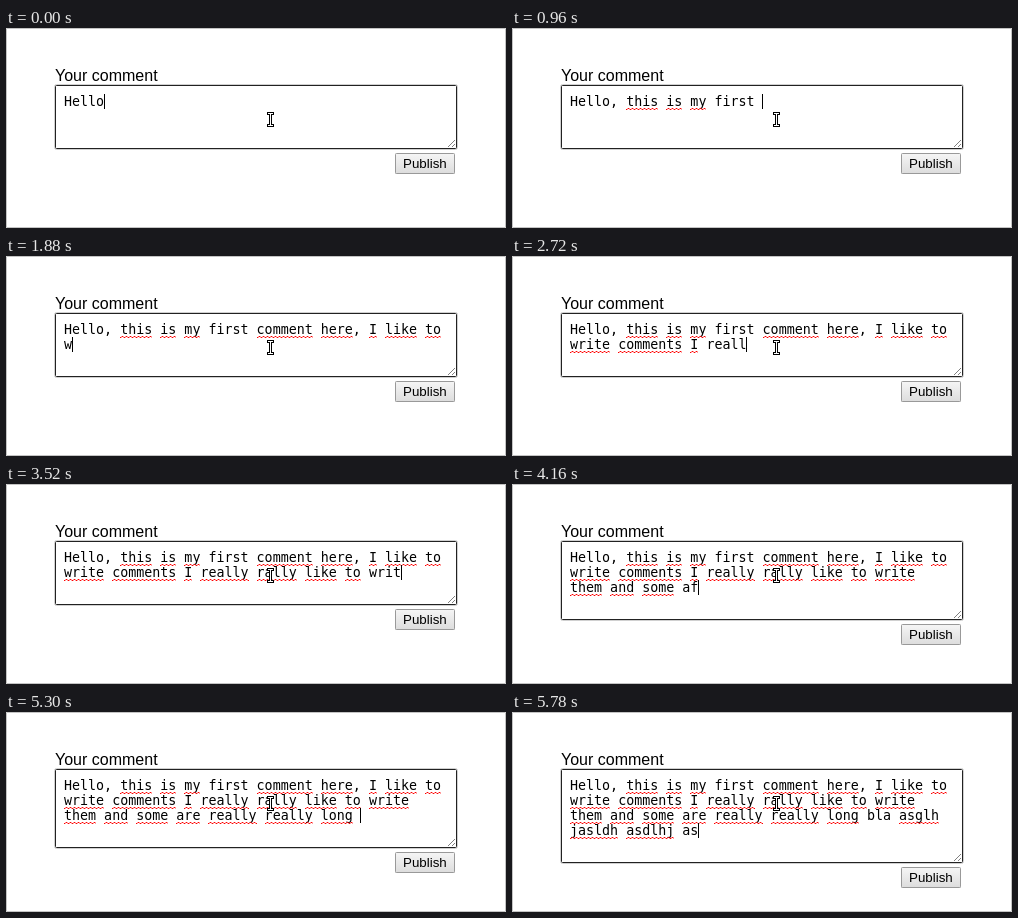
Recreate the animation shown at these times as an HTML page with a canvas. Size 500x200 px, loop 5820 ms.

```html
<!DOCTYPE html>
<html lang="en">
<head>
<meta charset="utf-8">
<title>Growing comment box</title>
<style>
html, body { margin: 0; width: 100%; height: 100%; overflow: hidden; background: #fff; }
canvas { display: block; width: 500px; height: 200px; }
</style>
</head>
<body>
<canvas id="stage" width="500" height="200"></canvas>
<script>
const ctx = document.getElementById('stage').getContext('2d');
const LOOP = 5820, COLS = 47, LEFT = 58, TOP = 66, LINE = 15;
const MONO = '13.333px "DejaVu Sans Mono", monospace';
const SANS = '"Liberation Sans", Arial, sans-serif';

// "<" stands for the backspace key
const KEYS = 'Hello, this is my first comment here, I like to ' +
  'write comments I really rally like to write ' +
  'them and some af<re really really long bla asglh jasldh asdlhj as';
// [time in ms, keys pressed so far]
const PACE = [[0, 5], [960, 24], [1860, 49], [3520, 90], [4160, 108], [5300, 131], [5440, 142], [5780, 157]];
const KNOWN = new Set(['Hello', 'first', 'bla']);

function keysAt(t) {
  for (let i = 1; i < PACE.length; i++) {
    const [t0, n0] = PACE[i - 1], [t1, n1] = PACE[i];
    if (t < t1) return Math.floor(n0 + (n1 - n0) * (t - t0) / (t1 - t0) + 1e-6);
  }
  return KEYS.length;
}

function typed(count) {
  let text = '';
  for (const key of KEYS.slice(0, count)) text = key === '<' ? text.slice(0, -1) : text + key;
  return text;
}

function wrap(text) {
  const lines = [''];
  for (const word of text.match(/\S+\s*|\s+/g) || []) {
    const last = lines.length - 1;
    if ((lines[last] + word.trimEnd()).length > COLS) lines.push(word);
    else lines[last] += word;
  }
  return lines;
}

function rect(x, y, w, h, color) {
  ctx.fillStyle = color;
  ctx.fillRect(x, y, w, h);
}

function label(text, x, y, font) {
  ctx.font = font;
  ctx.fillStyle = '#000';
  ctx.fillText(text, x, y);
}

function frame(x, y, w, h, r, color) {
  ctx.strokeStyle = color;
  ctx.lineWidth = 1;
  ctx.beginPath();
  ctx.roundRect(x + 0.5, y + 0.5, w - 1, h - 1, r);
  ctx.stroke();
}

function squiggle(x0, x1, y) {
  const soft = 'rgba(255,0,0,0.38)';
  for (let x = x0; x < x1; x++) {
    const step = (x - x0) % 4;
    if (step % 2) rect(x, y, 1, 2, soft);
    else rect(x, y + (step ? 0 : 1), 1, 1, '#f00');
  }
}

function drawText(lines) {
  ctx.font = MONO;
  const advance = ctx.measureText('m').width;
  lines.forEach((line, row) => {
    const y = TOP + row * LINE;
    label(line, LEFT, y + 12, MONO);
    const lastRow = row === lines.length - 1;
    for (const m of line.matchAll(/\w+/g)) {
      const end = m.index + m[0].length;
      if (KNOWN.has(m[0]) || (lastRow && end === line.length)) continue;
      squiggle(Math.round(LEFT + m.index * advance), Math.round(LEFT + end * advance), y + 14);
    }
  });
  const row = lines.length - 1;
  const caret = Math.min(441, Math.floor(LEFT + lines[row].length * advance));
  rect(caret, TOP + row * LINE, 1, LINE, '#000');
}

function drawBox(bottom) {
  frame(48, 56, 404, bottom - 55, 2, '#d0d0d0');
  frame(49, 57, 402, bottom - 57, 1, '#222');
  ctx.strokeStyle = '#808080';
  ctx.beginPath();
  for (const size of [7, 3]) {
    ctx.moveTo(449 - size, bottom - 2);
    ctx.lineTo(449, bottom - 2 - size);
  }
  ctx.stroke();
}

function drawButton(y) {
  const shade = ctx.createLinearGradient(0, y, 0, y + 21);
  shade.addColorStop(0, '#f6f6f6');
  shade.addColorStop(1, '#dcdcdc');
  rect(389, y, 60, 21, shade);
  frame(389, y, 60, 21, 1, '#999');
  label('Publish', 397, y + 15, '13.333px ' + SANS);
}

function drawPointer() {
  rect(261, 84, 7, 3, '#000');
  rect(261, 96, 7, 3, '#000');
  rect(263, 86, 3, 11, '#000');
  rect(262, 85, 5, 1, '#fff');
  rect(262, 97, 5, 1, '#fff');
  rect(264, 85, 1, 13, '#fff');
}

function draw(now) {
  const t = Math.floor((now % LOOP) / 20) * 20;
  const lines = wrap(typed(keysAt(t)));
  const bottom = 121 + Math.max(0, lines.length - 2) * LINE;
  rect(0, 0, 500, 200, '#fff');
  frame(0, 0, 500, 200, 0, '#c4c4c4');
  label('Your comment', 49, 53, '16px ' + SANS);
  drawBox(bottom);
  drawText(lines);
  drawButton(bottom + 4);
  drawPointer();
}

const start = performance.now();
function tick() {
  draw(performance.now() - start);
  requestAnimationFrame(tick);
}
tick();
</script>
</body>
</html>
```
